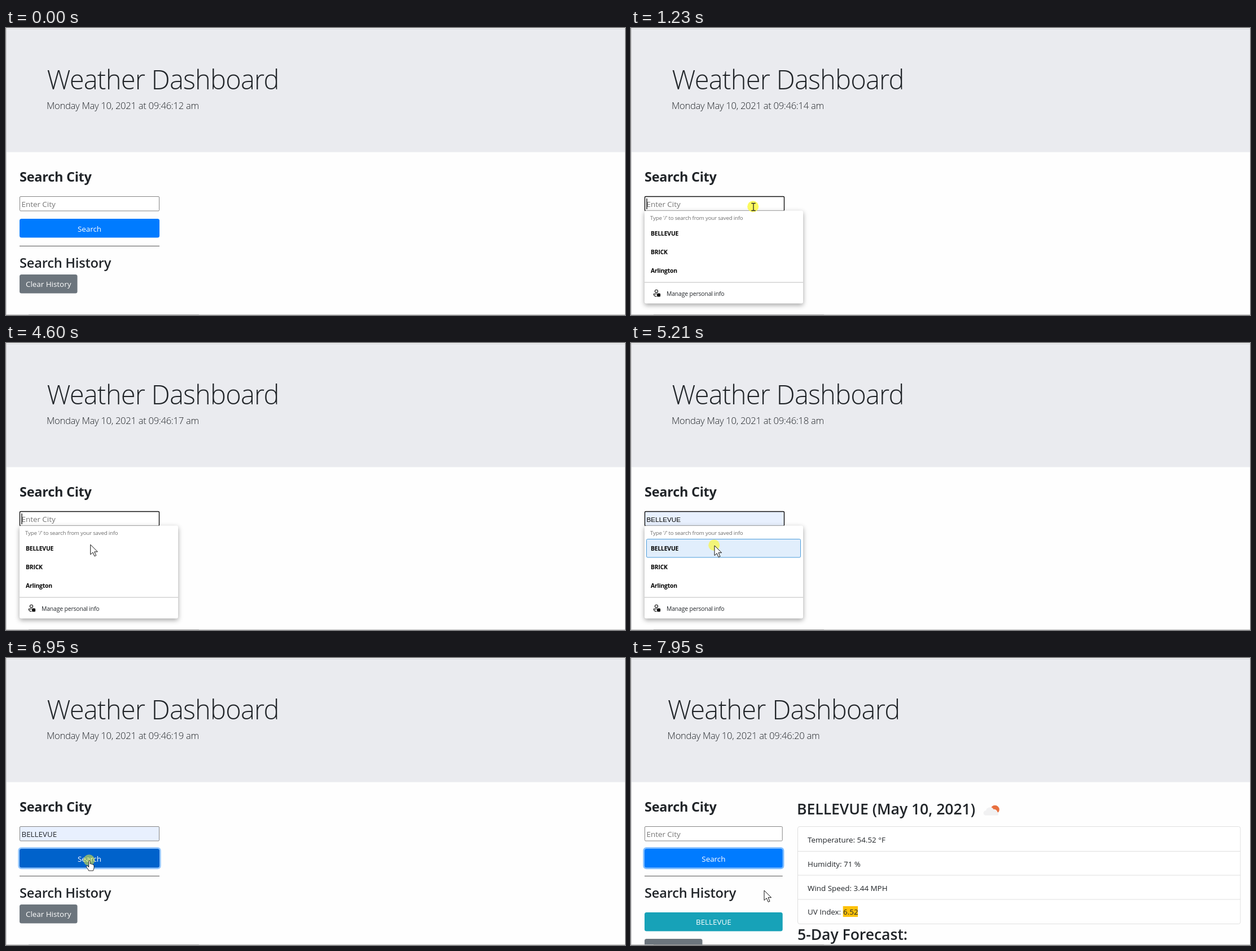
An HTML page for the animation above (8000 ms loop, 1097x510 px).

```html
<!DOCTYPE html>
<html lang="en">
<head>
<meta charset="utf-8">
<title>Weather Dashboard</title>
<style>
  html, body { margin: 0; width: 100%; height: 100%; overflow: hidden; background: #fefefe; }
  svg { display: block; width: 100%; height: 100%; }
  text { font-family: "Open Sans", "Noto Sans", sans-serif; font-size: 13.4px; fill: #212529; white-space: pre; }
  .title { font-size: 47px; font-weight: 300; letter-spacing: -.8px; }
  .date { font-size: 16.6px; font-weight: 300; letter-spacing: -.29px; }
  .city { font-size: 23.5px; font-weight: 700; letter-spacing: -.27px; }
  .history { font-size: 23.6px; font-weight: 600; letter-spacing: -.2px; }
  .heading { font-size: 26.6px; font-weight: 600; letter-spacing: -.05px; }
  .label { fill: #fff; text-anchor: middle; }
  .hint { font-size: 9.7px; letter-spacing: -.2px; fill: #6e6e6e; }
  .option { font-size: 10.4px; font-weight: 700; letter-spacing: -.2px; fill: #000; }
  .manage { font-size: 10.4px; letter-spacing: -.15px; }
  .placeholder { fill: #757575; }
  .preview { font-family: "Liberation Sans", Arial, sans-serif; font-size: 11.73px; fill: #000; }
  #menu .panel { filter: drop-shadow(0 3px 4px rgba(0, 0, 0, .36)); }
</style>
</head>
<body>
<svg viewBox="0 0 1097 510">
  <rect width="1097" height="510" fill="#fefefe"/>
  <rect y="1" width="1097" height="219.5" fill="#eaebef"/>
  <rect y="1" width="1097" height="1" fill="#d2d3d6"/>
  <rect width="1" height="510" fill="#c9c9cb"/>

  <g id="banner">
    <text class="title" x="72.5" y="108.5">Weather Dashboard</text>
    <text class="date" id="date" x="72" y="144"></text>
  </g>

  <text class="city" x="24" y="273">Search City</text>
  <rect id="field" class="fluid" x="24.5" y="299.5" height="25.5" rx="1.5"/>
  <text id="value" x="27.5" y="318"></text>
  <rect id="caret" y="303" width="1.3" height="19"/>

  <rect id="ring" class="fluid" x="22.8" y="337.8" height="36" rx="4.5" fill="none" stroke="#80bdff" stroke-width="3" data-grow="3.4"/>
  <rect id="button" class="fluid" x="24" y="339" height="33.5" rx="3.5" data-grow="1"/>
  <text class="label" id="searchLabel" y="362">Search</text>
  <rect class="fluid" x="24" y="387" height="1" fill="#555" data-grow="1"/>

  <text class="history" x="24" y="426">Search History</text>
  <g id="recent">
    <rect x="24" y="452" width="244.7" height="33.5" rx="3.5" fill="#17a2b8"/>
    <text class="label" x="146.3" y="474">BELLEVUE</text>
  </g>
  <g id="clear">
    <rect x="24" y="438" width="102.5" height="33.5" rx="3.5" fill="#6c757d"/>
    <text class="label" x="75.2" y="460">Clear History</text>
  </g>

  <g id="results">
    <text class="heading" x="294" y="277.5">BELLEVUE (May 10, 2021)</text>
    <circle cx="645" cy="269.5" r="7.8" fill="#e8703f"/>
    <path d="M629 280a4.6 4.6 0 0 1 0-9.2a7.2 7.2 0 0 1 13.4-1.6a5.5 5.5 0 0 1 6.6 4.6a3.2 3.2 0 0 1 0 6.2z" fill="#f1f1f2" stroke="#fefefe" stroke-width=".6"/>
    <rect x="295.5" y="299.5" width="784.5" height="173" rx="3.5" fill="#fff" stroke="#dfdfdf"/>
    <path d="M295.5 343.5H1080M295.5 386H1080M295.5 429H1080" stroke="#dfdfdf"/>
    <text x="313" y="327.5">Temperature: 54.52 °F</text>
    <text x="313" y="370.5">Humidity: 71 %</text>
    <text x="313" y="413.5">Wind Speed: 3.44 MPH</text>
    <text x="313" y="456">UV Index:</text>
    <rect x="375.7" y="441" width="26.3" height="19" fill="#ffc107"/>
    <text x="376" y="456">6.52</text>
    <text class="heading" x="295" y="500.5">5-Day Forecast:</text>
  </g>

  <g id="menu">
    <rect class="panel" x="24" y="324.5" width="281" height="165" rx="3" fill="#fff"/>
    <text class="hint" x="34" y="340.5">Type '/' to search from your saved info</text>
    <rect id="choice" x="27.5" y="348.5" width="273" height="32.5" rx="2" fill="#e1eefc" stroke="#4c9cdb"/>
    <text class="option" x="35" y="368.7">BELLEVUE</text>
    <text class="option" x="35" y="402">BRICK</text>
    <text class="option" x="35" y="435.3">Arlington</text>
    <rect x="24" y="451.3" width="281" height="1.5" fill="#d3d3d3"/>
    <g fill="none" stroke="#111" stroke-width="1.1">
      <circle cx="45" cy="467.8" r="2.6"/>
      <path d="M45.5 477C42 477 40.3 475.5 40.3 472.6H45.5"/>
      <rect x="46.6" y="472" width="5" height="5" rx="1" fill="#111"/>
    </g>
    <text class="manage" x="63" y="475.5">Manage personal info</text>
  </g>

  <path d="M0 509.5H1097" stroke="#bdbdbd"/>
  <path d="M40 509.5H342" stroke="#9c9c9c"/>

  <circle id="halo" r="10" fill="#fbf832"/>
  <g id="pointer" stroke-linejoin="round">
    <path id="arrow" d="M0 0V17.6L4.2 13.8L7.2 20.6L10 19.3L7 12.7H12.6Z" fill="#fff" stroke="#111"/>
    <path id="hand" d="M-1.3 1.2C-1.3-.4 1.2-.4 1.2 1.2V6C2 5.2 3.6 5.5 3.7 6.6C4.8 6 6 6.5 6.1 7.5C7.2 7.2 8 7.8 8 9V12.5C8 14.5 6.8 15.5 6.6 18H-1.6C-2 15.5-4.4 13.4-5.6 11C-6.2 9.4-4.4 8.6-3.2 9.8L-1.3 11.6Z" fill="#fff" stroke="#111" stroke-width=".9"/>
    <path id="ibeam" d="M-3.7-6.5H-.8L0-6L.8-6.5H3.7M0-6V6M-3.7 6.5H-.8L0 6L.8 6.5H3.7" fill="none" stroke="#222" stroke-width="1.3"/>
  </g>
</svg>
<script>
const LOOP = 8000, STEP = 70;
const $ = id => document.getElementById(id);
const show = (id, on) => { $(id).style.display = on ? "" : "none"; };
const within = (t, from, to) => t >= from && t < to;

// Each row: time, then values to blend between rows
const path = [
  [130, 989, 485], [340, 560, 402], [480, 300, 362], [620, 239, 348], [890, 238, 344],
  [960, 228, 330], [1030, 217, 318], [1630, 217, 318], [1700, 217, 316],
  [4200, 217, 316], [4390, 212, 320], [4600, 150, 358], [4750, 148, 360],
  [7350, 148, 360], [7950, 236, 413]
];
const shade = [
  [440, 0], [590, 1], [900, 1], [1030, 0], [5250, 0], [5340, 1], [6820, 1],
  [6890, 1.37], [7090, 1.37], [7220, 1], [7500, 1], [7640, 0]
];
const glow = [[6820, 0], [6950, .85], [7090, 1]];
const ticks = [230, 1230, 2220, 3200, 4200, 5140, 6210, 7200];
const blinks = [[1230, 1760], [2280, 2810], [3340, 3800], [4390, 4820], [5340, 5810], [6340, 6820]];
const clicks = [[1230, 1360, .78], [5140, 5400, .65], [6820, 7090, .52]];

function blend(rows, t) {
  const next = rows.findIndex(row => row[0] > t);
  if (next === 0) return rows[0].slice(1);
  if (next < 0) return rows[rows.length - 1].slice(1);
  const a = rows[next - 1], b = rows[next];
  const k = (t - a[0]) / (b[0] - a[0]);
  return a.slice(1).map((v, i) => v + (b[i + 1] - v) * k);
}

function drawPage(t) {
  const narrow = t >= 7220;
  const right = narrow ? 268.7 : 272;
  const seconds = 12 + ticks.filter(tick => t >= tick).length;
  $("date").textContent = `Monday May 10, 2021 at 09:46:${seconds} am`;
  $("banner").setAttribute("transform", `translate(${narrow ? -7.4 : 0})`);
  $("clear").setAttribute("transform", `translate(0 ${narrow ? 61 : 0})`);
  $("searchLabel").setAttribute("x", (24 + right) / 2);
  for (const el of document.querySelectorAll(".fluid")) {
    el.setAttribute("width", right - 25 + Number(el.dataset.grow || 0));
  }
  show("recent", narrow);
  show("results", t >= 7420);

  const k = blend(shade, t)[0];
  $("button").setAttribute("fill", `rgb(0,${Math.round(123 - 18 * k)},${Math.round(255 - 38 * k)})`);
  $("ring").setAttribute("opacity", blend(glow, t)[0]);
}

function drawField(t) {
  const focused = within(t, 1230, 6820);
  const filled = within(t, 4820, 7220);
  const field = $("field"), value = $("value");
  field.setAttribute("stroke", focused ? "#101010" : "#858585");
  field.setAttribute("stroke-width", focused ? 1.4 : 1);
  field.setAttribute("fill", filled ? "#e8f0fe" : "#fff");
  value.textContent = filled ? "BELLEVUE" : "Enter City";
  value.setAttribute("class", !filled ? "placeholder" : t < 5270 ? "preview" : "");
  $("caret").setAttribute("x", t < 4820 ? 27.4 : 88);
  show("caret", blinks.some(([a, b]) => within(t, a, b)));
  show("menu", within(t, 1230, 5340));
  $("menu").setAttribute("opacity", t < 5270 ? 1 : .5);
  show("choice", t >= 4820);
}

function drawPointer(t) {
  const [x, y] = blend(path, Math.round(t / STEP) * STEP);
  const inside = x > 24 && x < 272;
  const kind = inside && within(y, 299, 325) ? "ibeam"
    : inside && within(y, 339, 373) && !within(t, 1230, 5340) ? "hand" : "arrow";
  for (const id of ["arrow", "hand", "ibeam"]) show(id, id === kind);
  show("pointer", t >= 130);
  $("pointer").setAttribute("transform", `translate(${x} ${y})`);

  const click = clicks.find(([a, b]) => within(t, a, b));
  show("halo", click);
  if (click) {
    $("halo").setAttribute("opacity", click[2]);
    $("halo").setAttribute("cx", x - .8);
    $("halo").setAttribute("cy", y - .8);
  }
}

function frame() {
  const t = performance.now() % LOOP;
  drawPage(t);
  drawField(t);
  drawPointer(t);
  requestAnimationFrame(frame);
}
frame();
</script>
</body>
</html>
```
